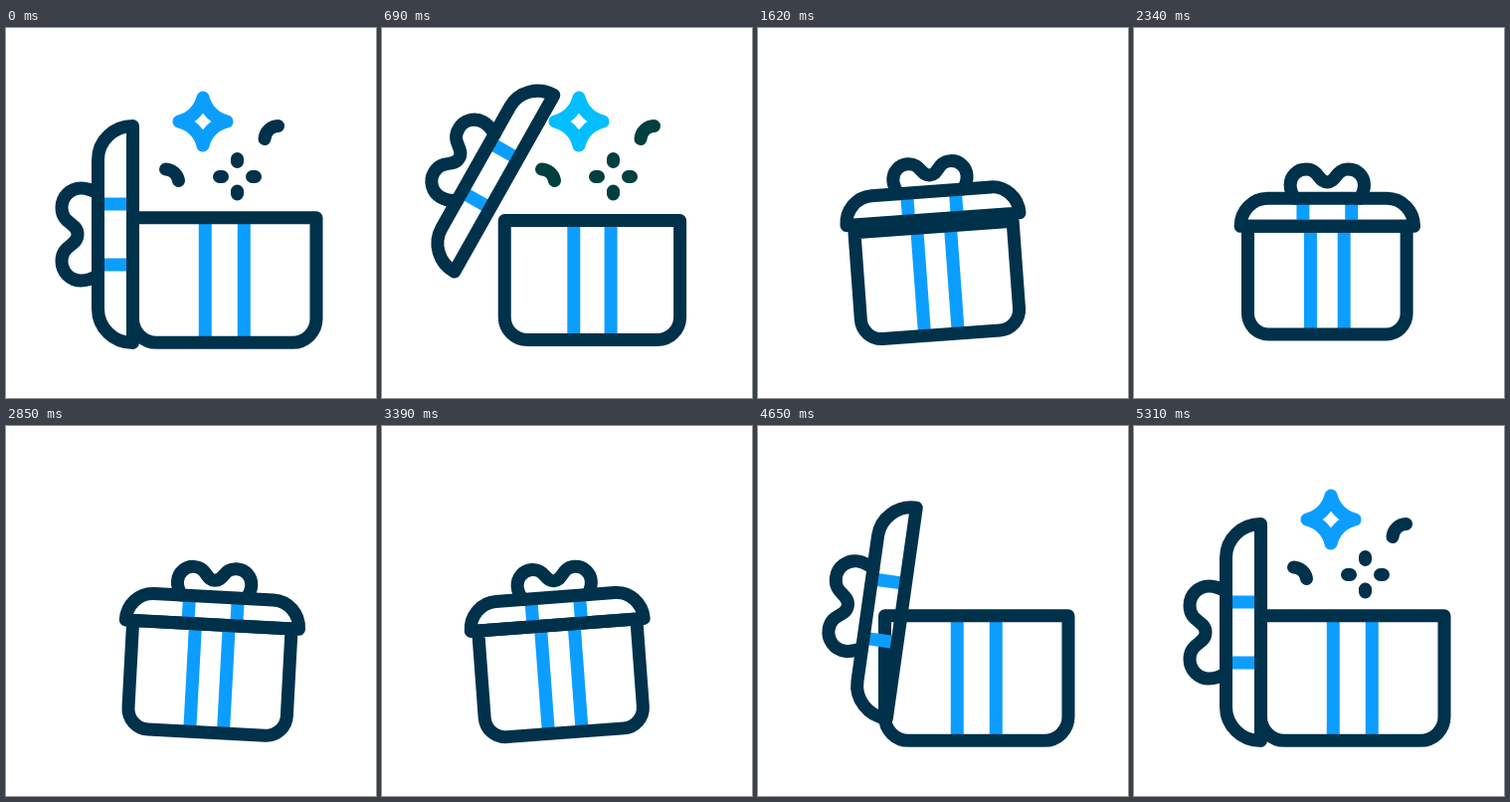
Recreate the animation shown at these times as an HTML page. Size 372 by 372 pixels, loop 5.4 s.

```html
<!DOCTYPE html>
<html lang="en">
<head>
<meta charset="utf-8">
<title>Gift box</title>
<style>
  html, body { margin: 0; height: 100%; overflow: hidden; background: #fff; }
  svg { display: block; width: 100%; height: 100%; }
  path { fill: none; stroke: #00314b; stroke-width: 13px; stroke-linecap: round; stroke-linejoin: round; vector-effect: non-scaling-stroke; }
  .blue { stroke: #0c9eff; }
  .ribbon { stroke-linecap: butt; }
  #sparkles path { stroke: color-mix(in srgb, #00314b, #00443c var(--fade)); }
  #sparkles .blue { stroke: color-mix(in srgb, #0c9eff, #00c8ff var(--fade)); }
</style>
</head>
<body>
<svg viewBox="0 0 372 372">
  <g id="sparkles">
    <path class="blue" d="M198 70Q203 89 222 94Q203 99 198 118Q193 99 174 94Q193 89 198 70Z"/>
    <path d="M232.5 131.5v3M232.5 164v3M214.5 149.5h3M247.5 149.5h3"/>
    <path d="M160.5 142A14 14 0 0 1 173.5 153.5M260 111.5A14 14 0 0 1 273.5 98.5"/>
  </g>
  <g id="gift">
    <g id="box">
      <path class="blue ribbon" d="M-19.5 -60V60M19.5 -60V60"/>
      <path d="M-92.25 -62.75H92.25V38.75A24 24 0 0 1 68.25 62.75H-68.25A24 24 0 0 1 -92.25 38.75Z"/>
    </g>
    <g id="lid">
      <path class="blue ribbon" d="M-30.5 -33V-3M30.5 -33V-3"/>
      <path d="M-41 -35Q-46.5 -44 -46.5 -52A19.5 19.5 0 0 1 -27 -71.5C-10 -71.5 -12 -55.5 0 -55.5C12 -55.5 10 -71.5 27 -71.5A19.5 19.5 0 0 1 46.5 -52Q46.5 -44 41 -35"/>
      <path d="M-109 0H109A34 35 0 0 0 75 -35H-75A34 35 0 0 0 -109 0Z"/>
    </g>
  </g>
</svg>
<script>
const LOOP = 5400, STEP = 30;
const CLOSE = 300, OPEN = 3720;
const ROCK_START = 1470, ROCK_PERIOD = 870, ROCK_TURNS = 2.5, ROCK_ANGLE = 4.25;
const SPARKLES_OFF = 720, SPARKLES_ON = 4860, SPARKLE_FADE = 120;

const { sin, PI, min, max } = Math;
const [sparkles, gift, box, lid] = ['sparkles', 'gift', 'box', 'lid'].map(id => document.getElementById(id));

const clamp = (v, top = 1) => min(top, max(0, v));
const mix = (a, b, u) => a + (b - a) * u;
const ease = (t, from, to) => {
  const u = clamp((t - from) / (to - from));
  return u * u * (3 - 2 * u);
};

function place(el, x, y, scale, rotation = 0) {
  el.setAttribute('transform', `translate(${x} ${y}) rotate(${rotation}) scale(${scale})`);
}

function drawBox(t) {
  const closed = ease(t, CLOSE, 1320) - ease(t, OPEN, 4200);
  place(box, mix(219.75, 194.3, closed), 253.6, mix(1, .865, closed));
}

// The lid turns between hinged and flat while arcs carry it over the box.
function drawLid(t) {
  const closing = ease(t, CLOSE, 1320);
  const closed = closing - ease(t, OPEN, 4860);
  const hover = ease(t, CLOSE, 1090) - ease(t, 1330, 1680);
  const toss = sin(PI * ease(t, OPEN, 4800));
  const x = mix(127.5, 194.3, closed) - 31 * sin(PI * closing) + 66 * toss;
  const y = mix(207.5, 199.3, closed) - 99 * hover - 113 * toss;
  place(lid, x, y, mix(1, .8, closed), mix(-90, 0, closed));
}

// The closed gift swings about a point far below it, lingering at each side.
function rock(t) {
  const turns = clamp((t - ROCK_START) / ROCK_PERIOD, ROCK_TURNS);
  const angle = -ROCK_ANGLE * sin(PI / 2 * sin(2 * PI * turns));
  gift.setAttribute('transform', `rotate(${angle} 194.3 443)`);
}

function drawSparkles(t) {
  const strength = clamp(max(SPARKLES_OFF - t, t - SPARKLES_ON) / SPARKLE_FADE);
  sparkles.style.setProperty('--fade', `${100 * (1 - strength)}%`);
  sparkles.style.visibility = strength > 0 ? 'visible' : 'hidden';
}

const start = performance.now();
function tick() {
  const t = Math.floor((performance.now() - start) % LOOP / STEP) * STEP;
  for (const draw of [drawBox, drawLid, rock, drawSparkles]) draw(t);
  requestAnimationFrame(tick);
}
tick();
</script>
</body>
</html>
```
